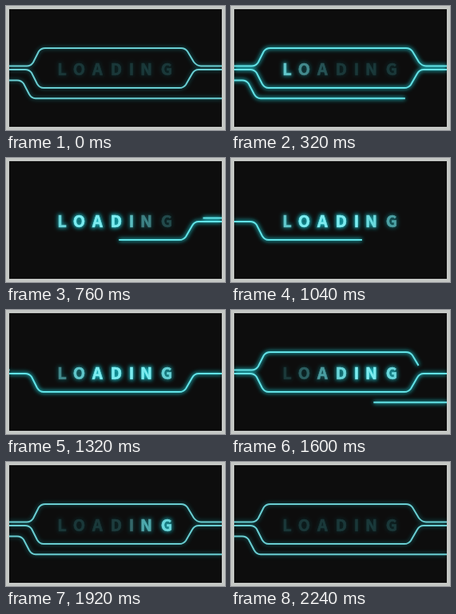
An HTML page for the animation above (2.4 s loop, 274 by 156 pixels).

```html
<!DOCTYPE html>
<html lang="en">
<head>
<meta charset="utf-8">
<title>Loading</title>
<style>
  html, body { margin: 0; width: 100%; height: 100%; overflow: hidden; background: #c5c8c5; }
  svg { display: block; width: 100vw; height: 100vh; }
  text { font: 700 20px "Noto Sans CJK SC", "Noto Sans CJK JP", "Noto Sans CJK", "Open Sans", sans-serif; text-anchor: middle; }
</style>
</head>
<body>
<svg viewBox="0 0 274 156">
  <defs>
    <filter id="blur" filterUnits="userSpaceOnUse" x="-10" y="0" width="294" height="156">
      <feGaussianBlur stdDeviation="2.5"/>
    </filter>
    <filter id="soften" filterUnits="userSpaceOnUse" x="-10" y="0" width="294" height="156">
      <feGaussianBlur stdDeviation="0.4"/>
    </filter>
    <clipPath id="screen"><rect x="4" y="4" width="266" height="148"/></clipPath>
  </defs>
  <rect width="274" height="156" fill="#c5c8c5"/>
  <g clip-path="url(#screen)">
    <rect x="4" y="4" width="266" height="148" fill="#0d0d0d"/>
    <g id="lineGlow" filter="url(#blur)" fill="none" stroke="#1cc4cc" stroke-width="4.5"></g>
    <g id="lineCore" filter="url(#soften)" fill="none" stroke-width="2"></g>
    <g id="textGlow" filter="url(#blur)" fill="#1cccd6" stroke="#1cccd6" stroke-width="3"></g>
    <g id="textCore" fill="#7cecf0" stroke="#7cecf0" stroke-width="0.6"></g>
  </g>
</svg>
<script>
const LOOP = 2400, STEP = 40, TRAVEL = 435, TAPER = 2;

const lines = [
  { d: "M4 75.5H26Q31 75.5 34 71L41 57Q44 53 49 53H219Q224 53 227 57L235 70.5Q239 75.5 244 75.5H270",
    leave: 345, enter: 1318 },
  { d: "M4 80H24Q29 80 32 84L39 98Q42 103 47 103H217Q222 103 225 99L233 85Q236 80 241 80H270",
    leave: 450, enter: 880 },
  { d: "M-6 93.5H14Q19 93.5 22 97.5L29 111Q32 116.2 37 116.2H270",
    leave: 138, enter: 1522, fromRight: true }
];
const centers = [70, 91.5, 114.5, 138, 157, 175.5, 201];

const byId = id => document.getElementById(id);
const clamp = v => Math.max(0, Math.min(1, v));
const mix = (a, b, k) => a + (b - a) * k;
const easeIn = u => u * u;
const easeOut = u => 1 - (1 - u) ** 2;
const smooth = u => u * u * (3 - 2 * u);

function add(parent, tag, attrs, content = "") {
  const el = document.createElementNS("http://www.w3.org/2000/svg", tag);
  for (const key in attrs) el.setAttribute(key, attrs[key]);
  el.textContent = content;
  return byId(parent).appendChild(el);
}

for (const line of lines) {
  line.parts = ["lineGlow", "lineCore"].map(g => add(g, "path", { d: line.d }));
  line.length = line.parts[0].getTotalLength();
}

const letters = [..."LOADING"].map((ch, i) =>
  ["textGlow", "textCore"].map(g => add(g, "text", { x: centers[i], y: 86.6 }, ch)));

function visibleSpan(line, t) {
  const gone = easeIn(clamp((t - line.leave) / TRAVEL));
  const back = easeOut(clamp((t - line.enter) / TRAVEL));
  const entering = t >= line.enter;
  if (line.fromRight) return entering ? [1 - back, 1] : [0, 1 - gone];
  return entering ? [0, back] : [gone, 1];
}

function drawLine(line, t) {
  const [from, to] = visibleSpan(line, t);
  const a = from * line.length + (from > 0 ? TAPER : 0);
  const b = to * line.length - (to < 1 ? TAPER : 0);
  for (const el of line.parts) {
    el.setAttribute("stroke-dasharray", `0 ${a} ${Math.max(0, b - a)} ${line.length * 2}`);
    el.setAttribute("visibility", b - a > 0.1 ? "visible" : "hidden");
  }
}

// Position, in letters, of the light front that slows down as it travels.
function front(t) {
  const u = Math.max(0, Math.min(1400, t - 80));
  return -1.8 + 0.0128 * u - 4.5e-6 * u * u;
}

function letterLight(i, t) {
  const on = clamp((front(t) - i + 1.8) / 3.6);
  const off = clamp((6 - front(2280 - t) - i + 1.8) / 3.6);
  return Math.min(on, 1 - off);
}

function render(t) {
  const power = smooth(clamp((t - 60) / 320)) * (1 - smooth(clamp((t - 1560) / 240)));
  byId("lineGlow").setAttribute("opacity", mix(0.26, 0.75, power));
  const rgb = [mix(106, 98, power), mix(206, 228, power), mix(210, 232, power)];
  byId("lineCore").setAttribute("stroke", `rgb(${rgb.map(Math.round)})`);
  lines.forEach(line => drawLine(line, t));
  letters.forEach(([glow, core], i) => {
    const light = letterLight(i, t);
    glow.setAttribute("opacity", mix(0.1, 0.85, light ** 2));
    core.setAttribute("opacity", mix(0.13, 1, light ** 1.4));
  });
}

const start = performance.now();
function tick() {
  const t = (performance.now() - start) % LOOP;
  render(Math.floor(t / STEP) * STEP);
  requestAnimationFrame(tick);
}
render(0);
requestAnimationFrame(tick);
</script>
</body>
</html>
```
